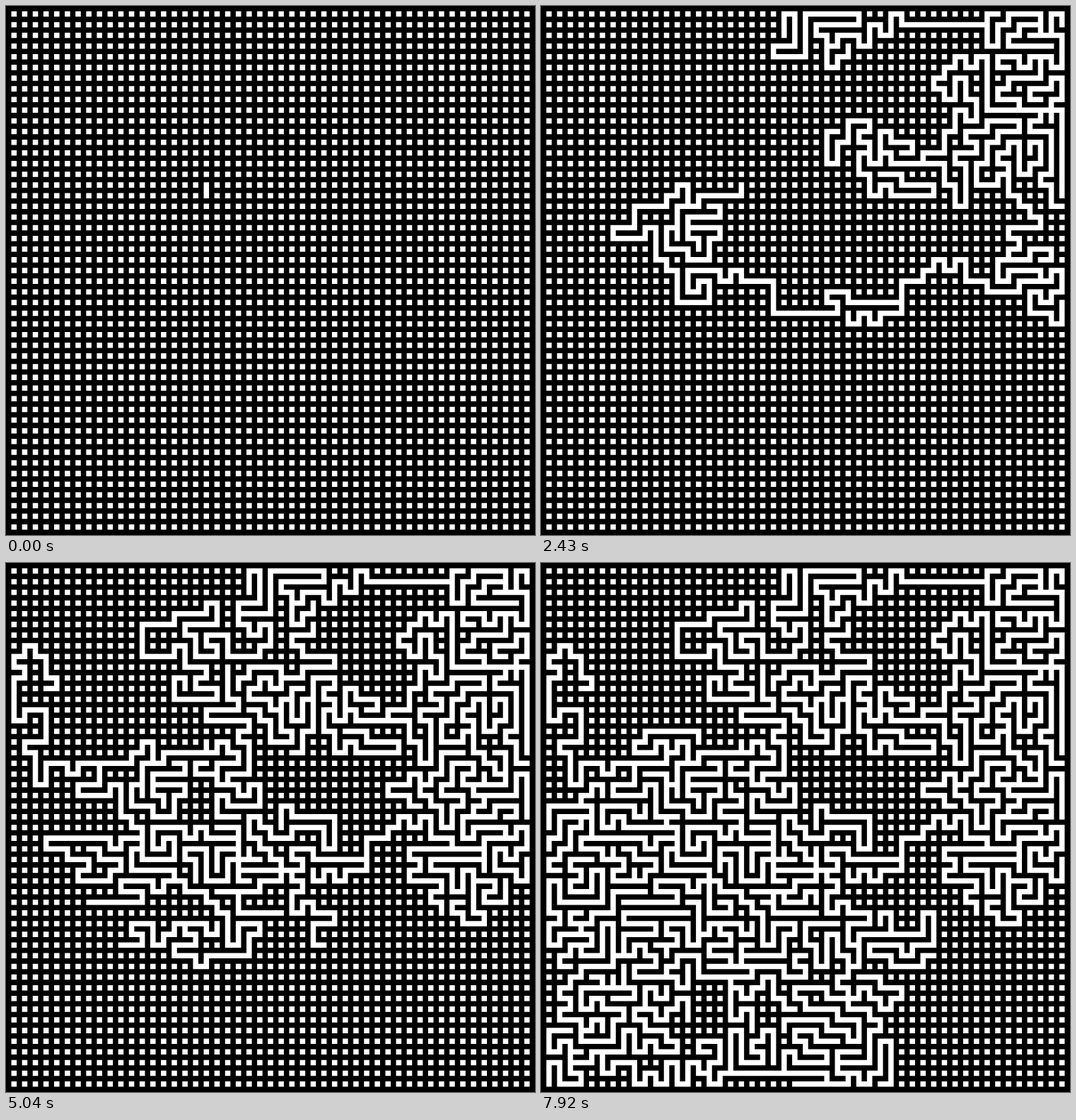
These frames come from a looping animation (748 by 748 pixels, 8000 ms). An HTML page with a canvas:

```html
<!DOCTYPE html>
<html lang="en">
<head>
<meta charset="utf-8">
<title>Maze</title>
<style>
  html, body { margin: 0; width: 100%; height: 100%; overflow: hidden; background: #000; }
  canvas { display: block; width: 100vw; height: 100vh; }
</style>
</head>
<body>
<canvas id="stage" width="748" height="748"></canvas>
<script>
const CELLS = 49, TILES = 2 * CELLS + 1;
const LOOP = 8000, TICK = 90, PER_TICK = 18;
const LAST_TICK = Math.floor(LOOP / TICK);
const TICKS_PER_GOAL = 3, MAX_DETOUR = 8;

// Cells (column, row) that the digger reaches one after another, at an even pace.
const goals = [
  [13, 20], [31, 27], [47, 25], [43, 14], [38, 6], [47, 9],
  [47, 1], [26, 3], [31, 14], [42, 20], [44, 27], [20, 19],
  [25, 12], [17, 6], [3, 11], [12, 26], [16, 33], [26, 28],
  [21, 27], [35, 35], [28, 40], [27, 47], [18, 38], [6, 40],
  [14, 47], [2, 45], [7, 39], [8, 34], [11, 27], [4, 24]
];

let seed = 20117;
const random = () => (seed = seed * 16807 % 2147483647) / 2147483647;
const distance = (a, b) => Math.abs(a[0] - b[0]) + Math.abs(a[1] - b[1]);
const linksAt = tick => 1 + PER_TICK * tick;

function digMaze() {
  const dug = new Set(), cells = [], links = [];
  const key = ([x, y]) => y * CELLS + x;
  let head = [18, 16];

  const visit = cell => { dug.add(key(cell)); cells.push(cell); };
  const moveTo = cell => { links.push([head, cell]); visit(cell); head = cell; };
  const openAround = ([x, y]) => [[x + 1, y], [x - 1, y], [x, y + 1], [x, y - 1]]
    .filter(c => Math.min(...c) >= 0 && Math.max(...c) < CELLS && !dug.has(key(c)));

  function nearestBranch(goal) {
    let best = null, reach = Infinity;
    for (const cell of cells) {
      const d = distance(cell, goal);
      if (d < reach && openAround(cell).length) { best = cell; reach = d; }
    }
    return best;
  }

  // The more steps are left for the way to the goal, the freer the walk.
  function step(goal, left) {
    const branch = nearestBranch(goal);
    const detour = distance(head, goal) - distance(branch, goal);
    if (!openAround(head).length || detour > MAX_DETOUR) head = branch;
    const slack = left / Math.max(1, distance(head, goal));
    const freedom = slack <= 1 ? 0.5 : Math.min(12, 3 * slack);
    let next, lowest = Infinity;
    for (const cell of openAround(head)) {
      const score = distance(cell, goal) + random() * freedom;
      if (score < lowest) { next = cell; lowest = score; }
    }
    moveTo(next);
  }

  visit(head);
  moveTo([18, 17]);
  goals.forEach((goal, i) => {
    const stop = linksAt(Math.min(LAST_TICK, TICKS_PER_GOAL * (i + 1)));
    while (links.length < stop) step(goal, stop - links.length);
  });
  return links;
}

const links = digMaze();
const canvas = document.getElementById('stage');
const ctx = canvas.getContext('2d');
const scale = canvas.width / TILES;

function draw(count) {
  ctx.setTransform(1, 0, 0, 1, 0, 0);
  ctx.fillStyle = '#000';
  ctx.fillRect(0, 0, canvas.width, canvas.height);
  ctx.setTransform(scale, 0, 0, scale, 0, 0);
  ctx.fillStyle = '#fff';
  ctx.beginPath();
  for (let y = 0; y < CELLS; y++)
    for (let x = 0; x < CELLS; x++) ctx.rect(2 * x + 1, 2 * y + 1, 1, 1);
  for (const [a, b] of links.slice(0, count))
    ctx.rect(a[0] + b[0] + 1, a[1] + b[1] + 1, 1, 1);
  ctx.fill();
}

const startTime = performance.now();
let shown = -1;
function frame() {
  const tick = Math.floor((performance.now() - startTime) % LOOP / TICK);
  if (tick !== shown) draw(linksAt(tick));
  shown = tick;
  requestAnimationFrame(frame);
}
frame();
</script>
</body>
</html>
```
